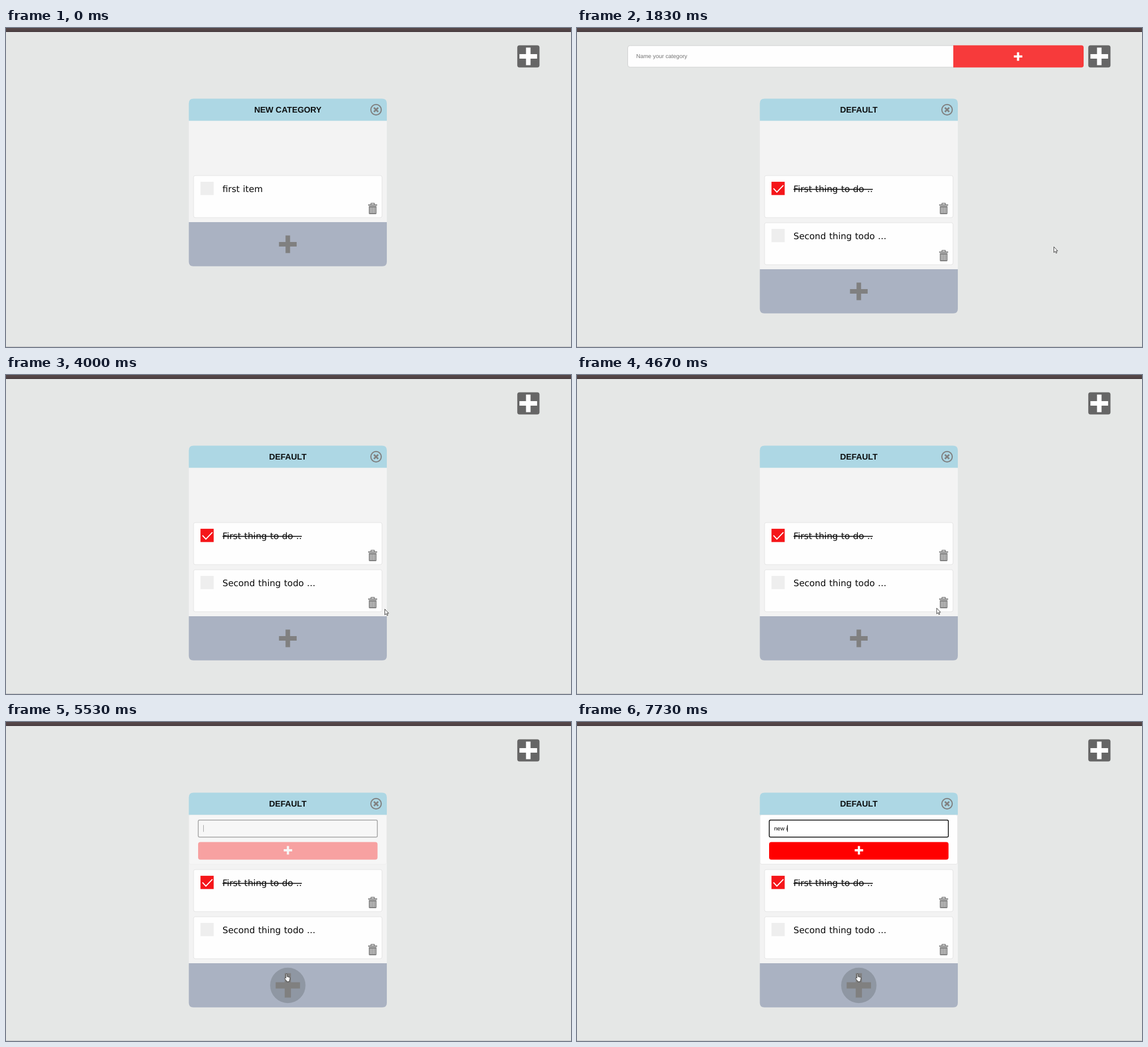
Animation, 997 px wide and 562 px high, one loop 8000 ms. Source, as an HTML page:

```html
<!DOCTYPE html>
<html lang="en">
<head>
<meta charset="utf-8">
<title>Todo list</title>
<style>
  html, body { margin: 0; height: 100%; overflow: hidden; background: #e5e7e6; }
  svg { display: block; width: 100vw; height: 100vh; }
  text { white-space: pre; text-rendering: geometricPrecision; }
  .title { font: bold 14.56px "Liberation Sans", Arial, sans-serif; text-anchor: middle; fill: #0c0f10; }
  .item { font: 15.6px "DejaVu Sans", Verdana, sans-serif; word-spacing: .035em; fill: #0a0a0a; }
  .done { text-decoration: line-through; }
  .field { font: 10px "Liberation Sans", Arial, sans-serif; }
  .gray { fill: #808080; }
  .white { fill: #fff; }
  .line { fill: none; stroke: #808080; }
</style>
</head>
<body>
<svg viewBox="0 0 997 562" preserveAspectRatio="none">
  <defs>
    <path id="plus" d="M-4-15.6h8V-4h11.6v8H4v11.6h-8V4h-11.6v-8H-4z"/>
    <g id="trash">
      <path class="line" d="M5 3V1.2Q5 .8 5.5 .8h5Q11 .8 11 1.2V3" stroke-width="1.5"/>
      <path class="gray" d="M0 2.800h16v2H0zM1.300 5.500h13.400v13q0 1.500-1.500 1.500H2.800q-1.500 0-1.500-1.500z"/>
      <path stroke="#f4f4f4" d="M4 8v10M6.700 8v10M9.300 8v10M12 8v10"/>
    </g>
    <g id="card">
      <rect x=".5" y=".5" width="332.500" height="74" rx="3" fill="#fefefe" stroke="#e4e4e4"/>
      <use href="#trash" x="308.500" y="48.500"/>
    </g>
    <rect id="box" x="343.200" y="270.900" width="23.300" height="23.400"/>
    <g id="head">
      <path d="M322.600 163.400v-30.400q0-8.400 8.400-8.400h332.600q8.400 0 8.400 8.400v30.400z" fill="#add7e4"/>
      <circle class="line" cx="653" cy="144" r="9.200" stroke-width="2"/>
      <path class="line" d="M649.200 140.200l7.600 7.600m0-7.600l-7.600 7.600" stroke-width="2.800"/>
    </g>
    <path id="foot" d="M322.600 0h349.400v69.800q0 8-8 8h-333.400q-8 0-8-8z" fill="#aab2c2"/>
  </defs>

  <rect width="997" height="562" fill="#e5e7e6"/>
  <rect width="997" height="7" fill="#3d3235"/>
  <rect width="997" height="5.500" fill="#534547"/>
  <rect y="561" width="997" height="1" fill="#c4c5c5"/>
  <rect x="902.200" y="30.500" width="39.200" height="38.900" rx="4" fill="#666"/>
  <use href="#plus" class="white" x="921.600" y="50"/>

  <g id="first">
    <rect x="322.600" y="160" width="349.400" height="184" fill="#f3f3f3"/>
    <use href="#head"/>
    <text class="title" x="497.300" y="149.200">NEW CATEGORY</text>
    <use href="#card" x="330.500" y="259.500"/>
    <use href="#box" fill="#eee"/>
    <text class="item" x="382" y="289">first item</text>
    <use href="#foot" y="342"/>
    <use href="#plus" class="gray" x="497.300" y="381"/>
  </g>

  <g id="second">
    <rect x="322.600" y="160" width="349.400" height="267" fill="#f3f3f3"/>
    <use href="#head"/>
    <text class="title" x="497.300" y="149.200">DEFAULT</text>
    <use href="#card" x="330.500" y="259.500"/>
    <use href="#card" x="330.500" y="342.500"/>
    <use href="#box" fill="#f5161a"/>
    <path d="M346.700 282.600l6 6.500 11.500-12" fill="none" stroke="#fff" stroke-width="1.900"/>
    <text class="item done" x="382" y="289">First thing to do ..</text>
    <use href="#box" y="83" fill="#eee"/>
    <text class="item" x="382" y="372">Second thing todo ...</text>
    <use href="#foot" y="425"/>
    <circle id="glow" cx="497.300" cy="464" r="31.200" fill="#8f97a3"/>
    <use id="add" href="#plus" class="gray"/>
    <g id="panel">
      <rect x="323" y="163.500" width="348.600" height="87" rx="3" fill="#fefefe" stroke="#e6e6e6"/>
      <rect x="322.600" y="160" width="349.400" height="3.400" fill="#add7e4"/>
      <rect x="339.300" y="172.700" width="316" height="30" rx="2.300" fill="#fff" stroke="#111" stroke-width="1.500"/>
      <rect x="339" y="211.400" width="316.600" height="31" rx="4" fill="#f00"/>
      <use href="#plus" class="white" transform="translate(497.500 226) scale(.48)"/>
      <text class="field" id="typed" x="347.800" y="191"></text>
      <rect id="caret" y="181.500" width="1" height="12" fill="#111"/>
    </g>
    <g id="namer">
      <rect x="89.500" y="31" width="580" height="38" rx="4" fill="#fefefe" stroke="#cfd0d0"/>
      <path d="M664 30.500h226q4 0 4 4v31q0 4-4 4h-226z" fill="#f73a3b"/>
      <text class="field" x="104.500" y="53" fill="#757575">Name your category</text>
      <use href="#plus" class="white" transform="translate(778.300 50.200) scale(.48)"/>
    </g>
  </g>

  <g id="cursor" fill="#fff" stroke="#333" stroke-width=".9" stroke-linejoin="round">
    <path id="arrow" d="M.5.500v10l2.300-2.100 1.600 3.400 1.500-.7-1.500-3.300h2.900z"/>
    <path id="hand" d="M3 8.500V1.600Q3 .5 4 .5t1 1.100v4l4 .9q1.200.3 1.100 1.700-.1 3-1.100 4.500v1.800H4v-1.700L.8 9.300Q.2 8 1.200 7.700T3 8.500z"/>
  </g>
</svg>
<script>
const LOOP = 8000, TICK = 106;
const SWAP = 1830, HOVER = 5200, OPEN = 5530;
const $ = id => document.getElementById(id);
const show = (id, alpha) => { $(id).style.opacity = Number(alpha); };
const place = (id, x, y, scale = 1) =>
  $(id).setAttribute('transform', `translate(${x} ${y}) scale(${scale})`);

// Progress from 0 to 1 in n even jumps, the first one at the start time.
const ramp = (t, start, n) =>
  Math.min(n, Math.max(0, Math.floor((t - start) / TICK) + 1)) / n;

// Mouse strokes: start time, jumps, end point.
const strokes = [
  [100, 4, 841, 385], [2370, 3, 573, 433], [2800, 4, 369, 377],
  [3235, 4, 425, 403], [3680, 2, 545, 389], [3890, 2, 668, 412],
  [4670, 4, 533, 405], [5100, 2, 492, 440], [5320, 1, 491, 443]
];

function pointer(t) {
  let x = 1033, y = 604;
  for (const [start, n, toX, toY] of strokes) {
    const p = ramp(t, start, n);
    x += (toX - x) * p;
    y += (toY - y) * p;
  }
  return [x, y];
}

const word = 'new i';
const keys = [6530, 6640, 6750, 7070, 7730];

function type(t) {
  const hit = keys.filter(k => k <= t);
  const typed = $('typed');
  typed.textContent = word.slice(0, hit.length);
  const width = hit.length ? typed.getComputedTextLength() : 0;
  place('caret', Math.round(348 + width), 0);
  const since = t - (hit.pop() ?? OPEN);
  show('caret', since % 1000 < 430);
}

function draw(t) {
  show('first', t < SWAP);
  show('second', t >= SWAP);
  show('namer', 1 - ramp(t, SWAP + 120, 3));

  const hover = ramp(t, HOVER, 3) ** 2.5;
  show('glow', hover);
  place('add', 497.3, 464, 1 + .38 * hover);
  show('arrow', t < HOVER);
  show('hand', t >= HOVER);
  show('cursor', t >= 100);
  place('cursor', ...pointer(t));

  show('panel', ramp(t, OPEN, 3));
  type(t);
}

let start;
function frame(now) {
  start ??= now;
  draw((now - start) % LOOP);
  requestAnimationFrame(frame);
}
draw(0);
requestAnimationFrame(frame);
</script>
</body>
</html>
```
